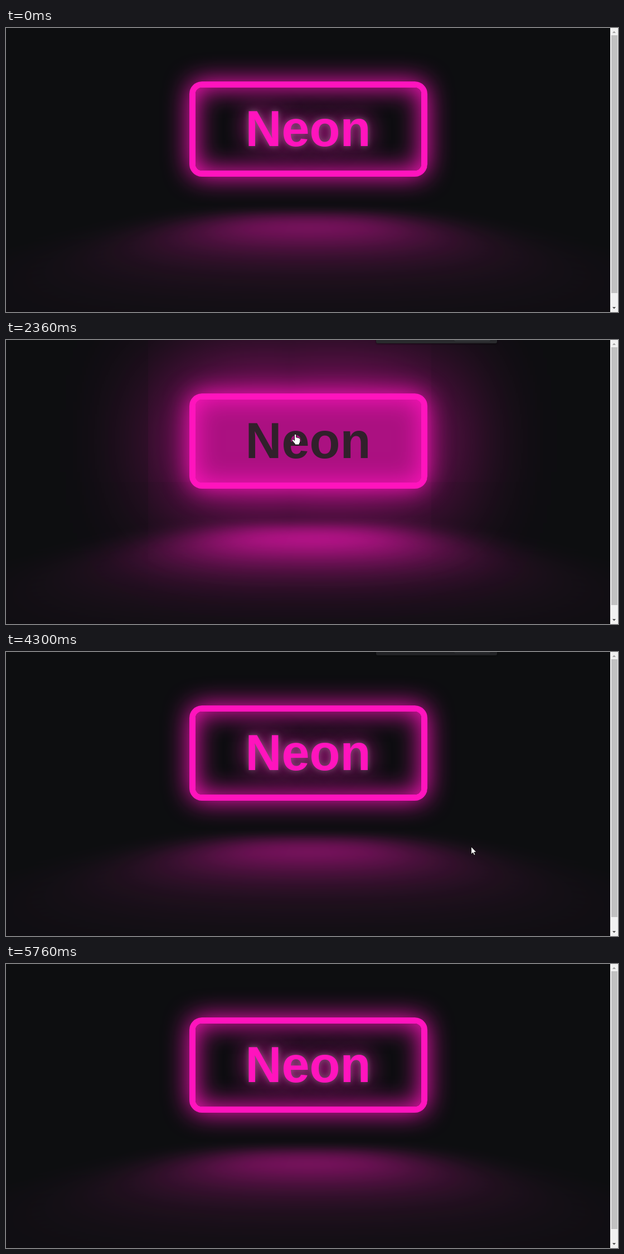
Recreate the animation shown at these times as an HTML page. Size 1098 px wide and 510 px high, loop 6900 ms.

```html
<!DOCTYPE html>
<html lang="en">
<head>
<meta charset="utf-8">
<title>Neon button</title>
<style>
  :root { --neon: hsl(317 100% 54%); --ink: hsl(323 21% 16%); }
  html, body { margin: 0; width: 100%; height: 100%; overflow: hidden; background: #0d0e10; }
  #page {
    position: absolute; inset: 0 14px 0 0; z-index: 0; overflow: hidden;
    display: flex; justify-content: center; align-items: flex-start;
  }
  #button {
    position: relative;
    font: bold 90px/1.15 "Liberation Sans", Arial, sans-serif;
    color: var(--neon);
    border: .125em solid; border-color: var(--neon); border-radius: .25em;
    padding: .25em 1em;
    text-shadow: 0 0 .125em hsl(0 0% 100% / .3), 0 0 .45em currentColor;
    box-shadow: inset 0 0 .5em var(--neon), 0 0 .5em var(--neon);
  }
  #button::before, #button::after { content: ""; position: absolute; background: var(--neon); }
  #button::before {
    top: 120%; left: 0; width: 100%; height: 100%;
    transform: perspective(1em) rotateX(40deg) scale(1, .35);
    filter: blur(1em); opacity: .7;
  }
  #button::after {
    inset: 0; z-index: -1; opacity: var(--glow);
    box-shadow: 0 0 2em .5em var(--neon);
  }
  #button.hover { color: var(--ink); text-shadow: none; }
  #button.hover::before { opacity: 1; }
  #bar { position: absolute; right: 0; top: 0; width: 14px; height: 510px; background: #f1f1f1; }
  #thumb { position: absolute; left: 2px; top: 13px; width: 11px; background: #c1c1c1; }
  #bar svg { position: absolute; inset: 0; }
  #popup {
    position: absolute; left: 664px; top: -20px; width: 217px; height: 26px;
    border-radius: 3px; background: #292a2d; box-shadow: 0 1px 3px #0008;
  }
  #popup::after {
    content: ""; position: absolute; left: 140px; top: 0; width: 63px; height: 20px;
    border: 1px solid #3c4043; border-radius: 3px;
  }
  #status {
    position: absolute; left: 0; bottom: 0; width: 360px; height: 17px; padding-left: 4px;
    border-radius: 0 3px 0 0; background: #fff; color: #6b6d70;
    font: 8.95px/17px "Open Sans", sans-serif;
  }
  #cursor { position: absolute; left: 0; top: 0; overflow: visible; }
</style>
</head>
<body>
<div id="page"><div id="button">Neon</div></div>
<div id="popup"></div>
<div id="status">127.0.0.1:5503/index.html#</div>
<div id="bar">
  <div id="thumb"></div>
  <svg width="14" height="510">
    <path d="M4 9l3-3.5 3 3.5z" fill="#a3a3a3"/>
    <path d="M4 501l3 3.5 3-3.5z" fill="#505050"/>
  </svg>
</div>
<svg id="cursor" width="20" height="24" fill="#fff" stroke="#000" stroke-width=".8" stroke-linejoin="round">
  <path id="arrow" d="M0 0V13.5L3.1 10.6 5.2 15.3 7.3 14.4 5.2 9.8H9.4z"/>
  <path id="hand" d="M-1.6 1Q0-1 1.5 1V6Q3.2 5 4 6.6 6 5.8 6.6 7.4 8.6 7 8.7 9V13Q8.6 15.5 7 17V19H-.8V17.5Q-3 15-5.8 11.2-6.3 9.2-4.2 9.2L-1.6 11.5z"/>
</svg>
<script>
const LOOP = 6900;
const [button, popup, status, thumb, cursor, arrow, hand] =
  ["button", "popup", "status", "thumb", "cursor", "arrow", "hand"].map(id => document.getElementById(id));

// Pointer path: time, x, y
const path = [
  [2230, 505, 130], [2360, 519, 169], [2760, 570, 182], [3559, 570, 182],
  [3560, 597, 187], [3630, 610, 192], [3760, 700, 275], [3900, 806, 351],
  [4200, 870, 380], [4400, 800, 320], [4530, 700, 255], [4630, 617, 191],
  [4750, 765, 215], [4900, 1004, 235], [5100, 997, 250], [5559, 997, 250],
  [5560, 850, 300], [5760, 70, 490]
];

const ramp = (t, start, length) => Math.min(1, Math.max(0, (t - start) / length));
const within = (t, from, to) => t >= from && t < to;

function pointer(t) {
  const i = path.findIndex(key => key[0] > t);
  if (i < 1) return null;
  const [t0, x0, y0] = path[i - 1], [t1, x1, y1] = path[i];
  const k = (t - t0) / (t1 - t0);
  return [x0 + (x1 - x0) * k, y0 + (y1 - y0) * k];
}

function zoomAt(t) {
  if (within(t, 630, 1230)) return 110 / 150;
  if (within(t, 500, 1360)) return 125 / 150;
  return 1;
}

function draw(t) {
  if (within(t, 3760, 3900)) t = 3760; // the screen stalls here
  const zoom = zoomAt(t);
  const hover = within(t, 2230, 3740) || within(t, 4530, 4760);

  button.style.fontSize = 90 * zoom + "px";
  button.style.marginTop = 255 + 12 * zoom - 171 * zoom + "px";
  button.classList.toggle("hover", hover);
  button.style.setProperty("--glow",
    ramp(t, 2230, 200) - ramp(t, 3740, 200) + ramp(t, 4530, 200) - ramp(t, 4760, 200));
  thumb.style.height = 484 * 510 / (510 + 23 * zoom) + "px";

  popup.style.opacity = ramp(t, 630, 200) - ramp(t, 4250, 200);
  status.style.opacity =
    ramp(t, 2500, 200) - ramp(t, 3990, 200) + ramp(t, 4700, 100) - ramp(t, 4950, 150);

  const at = pointer(t);
  cursor.style.display = at ? "" : "none";
  if (at) cursor.style.transform = `translate(${at[0]}px, ${at[1]}px)`;
  arrow.style.display = hover ? "none" : "";
  hand.style.display = hover ? "" : "none";
}

function tick(now) {
  draw(now % LOOP);
  requestAnimationFrame(tick);
}
draw(0);
requestAnimationFrame(tick);
</script>
</body>
</html>
```
